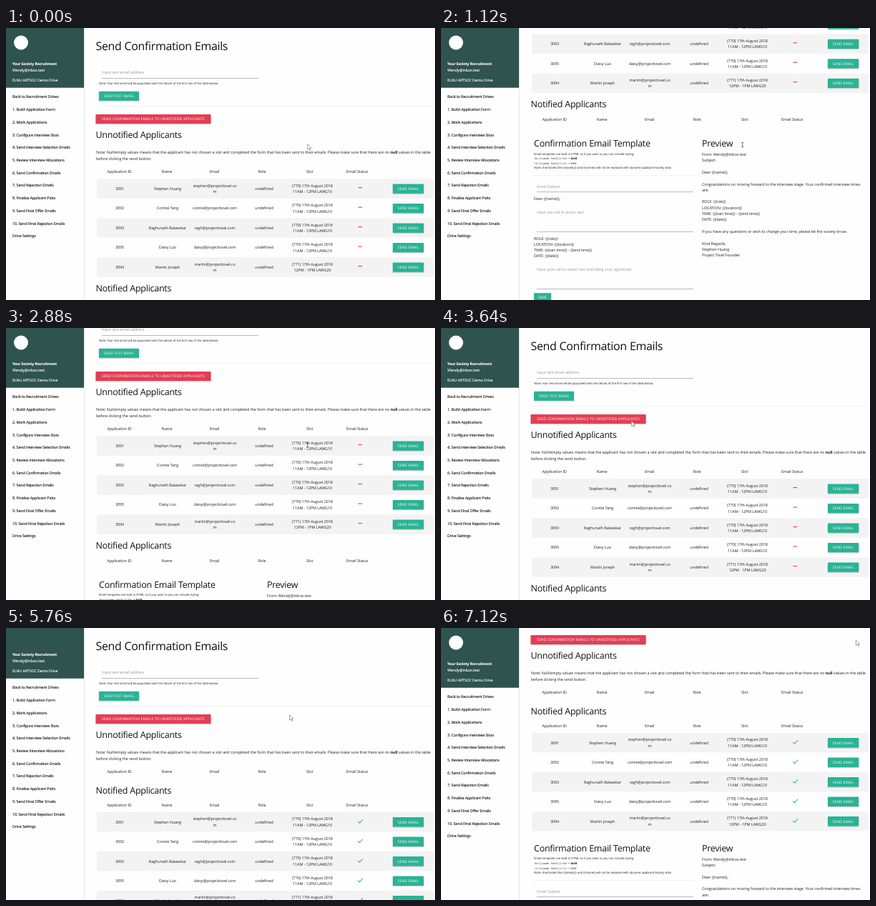
Animation, 600 px wide and 381 px high, one loop 7160 ms. Source, as an HTML page:

```html
<!DOCTYPE html>
<html lang="en">
<head>
<meta charset="utf-8">
<title>Send Confirmation Emails</title>
<style>
html, body { margin: 0; width: 100%; height: 100%; overflow: hidden; background: #fefefe; }
svg { display: block; width: 600px; height: 381px; }
text {
  font-family: "Open Sans", "Noto Sans", sans-serif;
  letter-spacing: -0.0225em;
  word-spacing: 0.02em;
  text-rendering: geometricPrecision;
  white-space: pre;
}
.caps { letter-spacing: 0.02em; }
.code { font-family: "Noto Sans Mono", "DejaVu Sans Mono", monospace; font-size: 39px; letter-spacing: 0; }
.bold { font-weight: 700; }
.italic { font-style: italic; }
.light { fill: #fff; stroke: #fff; stroke-width: 1.2px; }
.item { fill: #151515; stroke: #151515; stroke-width: 1.2px; }
</style>
</head>
<body>
<svg id="stage" viewBox="0 0 600 381"></svg>
<script>
const LOOP = 7160;
const INK = '#242424', GREY = '#9a9a9a', TEAL = '#2ab394', RED = '#e33e54';
const BODY = 5.52, SMALL = 4.22, HEAD = 12.55;
const MAIL = 'Wendy@inbox.test';
const stage = document.getElementById('stage');

function add(parent, tag, attrs = {}) {
  const el = document.createElementNS('http://www.w3.org/2000/svg', tag);
  for (const key in attrs) el.setAttribute(key, attrs[key]);
  parent.appendChild(el);
  return el;
}
const group = parent => add(parent, 'g');
const rect = (g, x, y, width, height, fill, more) =>
  add(g, 'rect', { x, y, width, height, fill, ...more });

// y is the middle of the capitals; content is a string or [string, class] runs.
// Set at ten times the size and scaled down, so tiny letters keep exact spacing.
function text(g, x, y, content, size = BODY, more = {}) {
  const el = add(g, 'text', {
    transform: `translate(${x} ${y + size * 0.35}) scale(0.1)`,
    'font-size': size * 10, fill: INK, ...more
  });
  if (typeof content === 'string') el.textContent = content;
  else for (const [part, cls] of content) add(el, 'tspan', { class: cls }).textContent = part;
  return el;
}
const centred = (g, x, y, s, size, more) => text(g, x, y, s, size, { 'text-anchor': 'middle', ...more });
const heading = (g, x, y, s, size = HEAD) => text(g, x, y, s, size, { fill: '#111' });

function button(parent, x, y, w, h, label, fill) {
  const g = group(parent);
  rect(g, x - 0.4, y + 0.6, w + 0.8, h + 0.7, '#000', { rx: 1, opacity: 0.16 });
  rect(g, x, y, w, h, fill, { rx: 0.8 });
  centred(g, x + w / 2, y + h / 2, label, 5, { fill: '#fff', class: 'caps' });
  return g;
}
function input(g, y, label, lineY) {
  text(g, 134, y, label, BODY, { fill: GREY });
  rect(g, 134, lineY, 219, 0.6, '#8e8e8e');
}

const applicants = [
  ['3091', 'Stephen Huang', 'stephen', true],
  ['3092', 'Connie Tang', 'connie'],
  ['3093', 'Raghunath Balasekar', 'ragh'],
  ['3095', 'Daisy Luo', 'daisy'],
  ['3094', 'Martin Joseph', 'martin', true, true]
];
const headers = ['Application ID', 'Name', 'Email', 'Role', 'Slot', 'Email Status'];

// Draws header and rows, returns the bottom edge
function table(g, headY, rows, sent) {
  headers.forEach((h, i) => centred(g, 158.6 + i * 66.5, headY, h));
  const top = headY + 9.75;
  rows.forEach(([id, name, user, wraps, late], i) => {
    const y = top + 13.75 + i * 27.5;
    if (i % 2 === 0) rect(g, 127, y - 13.75, 471, 27.5, '#f3f3f3');
    centred(g, 159, y, id);
    centred(g, 226, y, name);
    if (wraps) {
      centred(g, 292, y - 4.1, user + '@projecttovel.co');
      centred(g, 292, y + 4.2, 'm');
    } else centred(g, 292, y, user + '@projecttovel.com');
    centred(g, 361, y, 'undefined');
    centred(g, 428.5, y - 4.1, `(${late ? 771 : 770}) 17th August 2018`);
    centred(g, 428.5, y + 4.2, late ? '12PM - 1PM LAWG20' : '11AM - 12PM LAWG10');
    if (sent) {
      add(g, 'path', { d: `M492.2 ${y - 0.8}l2.3 2.4 4.4-4.8`, fill: 'none', stroke: '#35b873', 'stroke-width': 1.1 });
    } else rect(g, 492.5, y - 2, 5.6, 1.1, RED);
    button(g, 541, y - 6.6, 43.2, 13.4, 'SEND EMAIL', TEAL);
  });
  return top + rows.length * 27.5;
}

const details = ['ROLE: {{role}}', 'LOCATION: {{location}}',
  'TIME: {{start time}} - {{end time}}', 'DATE: {{date}}'];
const preview = ['From: ' + MAIL, 'Subject:', '', 'Dear {{name}},', '',
  'Congratulations on moving forward to the interview stage. Your confirmed interview times',
  'are:', '', ...details, '',
  'If you have any questions or wish to change your time, please let the society know.', '',
  'Kind Regards,', 'Stephen Huang', 'Project Tovel Founder'];

function template(parent, y) {
  const g = add(parent, 'g', { transform: `translate(0 ${y})` });
  heading(g, 130, 0, 'Confirmation Email Template');
  const notes = [
    'Email templates are built in HTML so if you want to you can include styling:',
    [['<b>{{some text}}</b>', 'code'], [' = ', ''], ['bold', 'bold']],
    [['<i>{{some text}}</i>', 'code'], [' = ', ''], ['italic', 'italic']],
    'Note: shortcodes like {{society}} and {{name}} will not be replaced with dynamic applicant/society data'
  ];
  notes.forEach((n, i) => text(g, 130, 14.5 + i * 6.6, n, SMALL));
  rect(g, 127, 45, 229, 0.5, '#e4e4e4');
  input(g, 60.3, 'Email Subject', 67.8);
  text(g, 130, 77.5, 'Dear {{name}},');
  input(g, 96, 'Input pre call to action text', 123.3);
  details.forEach((d, i) => text(g, 130, 133 + i * 8.3, d));
  input(g, 176.3, 'Input post call to action text (including your signature)', 203.8);
  button(g, 130, 209.5, 24, 13, 'SAVE', TEAL);
  heading(g, 365, 0, 'Preview');
  preview.forEach((line, i) => text(g, 365, 15.5 + i * 8.3, line));
}

function page(parent, sent) {
  const g = group(parent);
  heading(g, 125.5, 25.5, 'Send Confirmation Emails', 16);
  input(g, 62.5, 'Input test email address', 70.2);
  text(g, 130, 77.2, 'Note: Your test email will be populated with the details of the first row of the table below.', SMALL);
  button(g, 130, 88.7, 56, 13, 'SEND TEST EMAIL', TEAL);
  rect(g, 126, 109.5, 472, 0.5, '#e4e4e4');
  const send = button(g, 125.5, 121, 161, 13, 'SEND CONFIRMATION EMAILS TO UNNOTIFIED APPLICANTS', RED);
  heading(g, 125.5, 150, 'Unnotified Applicants');
  text(g, 126, 174.3, [
    ['Note: Null/empty values means that the applicant has not chosen a slot and completed the form that has been sent to their emails. Please make sure that there are no ', ''],
    ['null', 'bold'], [' values in the table', '']]);
  text(g, 126, 182.8, 'before clicking the send button.');
  const mid = table(g, 201.5, sent ? [] : applicants, false) + 15.9;
  heading(g, 125.5, mid, 'Notified Applicants');
  const end = table(g, mid + 21, sent ? applicants : [], true);
  template(g, end + 24);
  return { g, send };
}

const main = group(stage);
const before = page(main, false);
const after = page(main, true);

// Sidebar
const side = group(stage);
rect(side, 109, 0, 0.8, 400, '#e2e2e2');
rect(side, 0, 0, 109, 400, '#fefefe');
const menu = group(side);
rect(menu, 0, -20, 109, 103.7, '#2f534e');
text(menu, 9, 50, 'Your Society Recruitment', 5.1, { class: 'light bold' });
text(menu, 9, 59.3, MAIL, 5.4, { class: 'light' });
text(menu, 9, 73.5, 'ELNU ARTSOC Demo Drive', 5.3, { class: 'light' });
['Back to Recruitment Drives', '1. Build Application Form', '2. Mark Applications',
  '3. Configure Interview Slots', '4. Send Interview Selection Emails',
  '5. Review Interview Allocations', '6. Send Confirmation Emails', '7. Send Rejection Emails',
  '8. Finalise Applicant Picks', '9. Send Final Offer Emails',
  '10. Send Final Rejection Emails', 'Drive Settings'
].forEach((s, i) => text(menu, 9, 96.5 + i * 17.73, s, 5.35, { class: 'item' }));
const logo = add(side, 'circle', { cx: 21, cy: 20.5, r: 10, fill: '#fff' });

// Alert box
const dialog = group(stage);
rect(dialog, 218, -5, 171.5, 50.8, '#000', { opacity: 0.12, rx: 1 });
rect(dialog, 219, -5, 169.3, 49.3, '#fff', { stroke: '#bdbdbd', 'stroke-width': 0.6 });
['The emails are in the process of being sent. This process may take up to',
  '5 minutes. Refresh this page in 5 minutes to see status updates on each', 'email...'
].forEach((s, i) => text(dialog, 226, 2.2 + i * 7.4, s, 4.7, { fill: '#5a5a5a' }));
rect(dialog, 357.3, 26.6, 24.6, 12.4, '#4a80dd', { rx: 1 });
centred(dialog, 369.6, 32.8, 'OK', 4.5, { fill: '#fff' });

// Pointer
const pointer = group(stage);
const arrow = add(pointer, 'path', {
  d: 'M0 0V7.4L1.8 5.8 3 8.6 4.3 8 3.1 5.3H5.4Z', fill: '#fff', stroke: '#666', 'stroke-width': 0.6
});
const beam = add(pointer, 'path', {
  d: 'M-1.3 -2.2H1.3M0 -2.2V3.8M-1.3 3.8H1.3', fill: 'none', stroke: '#333', 'stroke-width': 0.7
});

const scrollKeys = [[0, 0], [400, 0], [640, 110], [880, 215], [1120, 257.7], [1240, 266],
  [2440, 266], [2600, 205], [2760, 110], [2880, 60.3], [3000, 25], [3160, 0],
  [6040, 0], [6280, 40], [6520, 90], [6720, 111]];
const pointerKeys = [[0, 421.7, 162.7], [3200, 421.7, 162.7], [3720, 256, 128], [3960, 256, 128],
  [4440, 380.5, 37], [4640, 380.5, 37], [5000, 40, -14], [5180, 60, -14], [5320, 140, 14],
  [5720, 396.5, 121.7], [6300, 396.5, 121.7], [6960, 580.3, 16.8]];
const dialogKeys = [[0, 0], [4000, 0], [4120, 1], [4520, 1], [4680, 0]];

const linear = p => p;
const smooth = p => p * p * (3 - 2 * p);
function track(keys, t, ease) {
  const i = keys.findIndex(k => k[0] > t);
  if (i < 0) return keys[keys.length - 1].slice(1);
  const a = keys[i - 1], b = keys[i];
  const p = ease((t - a[0]) / (b[0] - a[0]));
  return a.slice(1).map((v, n) => v + (b[n + 1] - v) * p);
}
const within = (t, from, to) => t >= from && t < to;
const show = (el, on) => el.setAttribute('display', on ? 'inline' : 'none');

function draw(t) {
  const reloaded = t >= 5440;
  const noLogo = within(t, 5440, 5880);
  const typing = within(t, 1040, 1280) || within(t, 2760, 3000);
  main.setAttribute('transform', `translate(0 ${-track(scrollKeys, t, linear)[0]})`);
  show(before.g, !reloaded);
  show(after.g, reloaded);
  before.send.setAttribute('opacity', t >= 3920 ? 0.56 : 1);
  show(logo, !noLogo);
  menu.setAttribute('transform', `translate(0 ${noLogo ? -13 : 0})`);
  dialog.setAttribute('opacity', track(dialogKeys, t, linear)[0]);
  pointer.setAttribute('transform', `translate(${track(pointerKeys, t, smooth)})`);
  show(arrow, !typing);
  show(beam, typing);
}

const start = performance.now();
function tick() {
  draw((performance.now() - start) % LOOP);
  requestAnimationFrame(tick);
}
tick();
</script>
</body>
</html>
```
